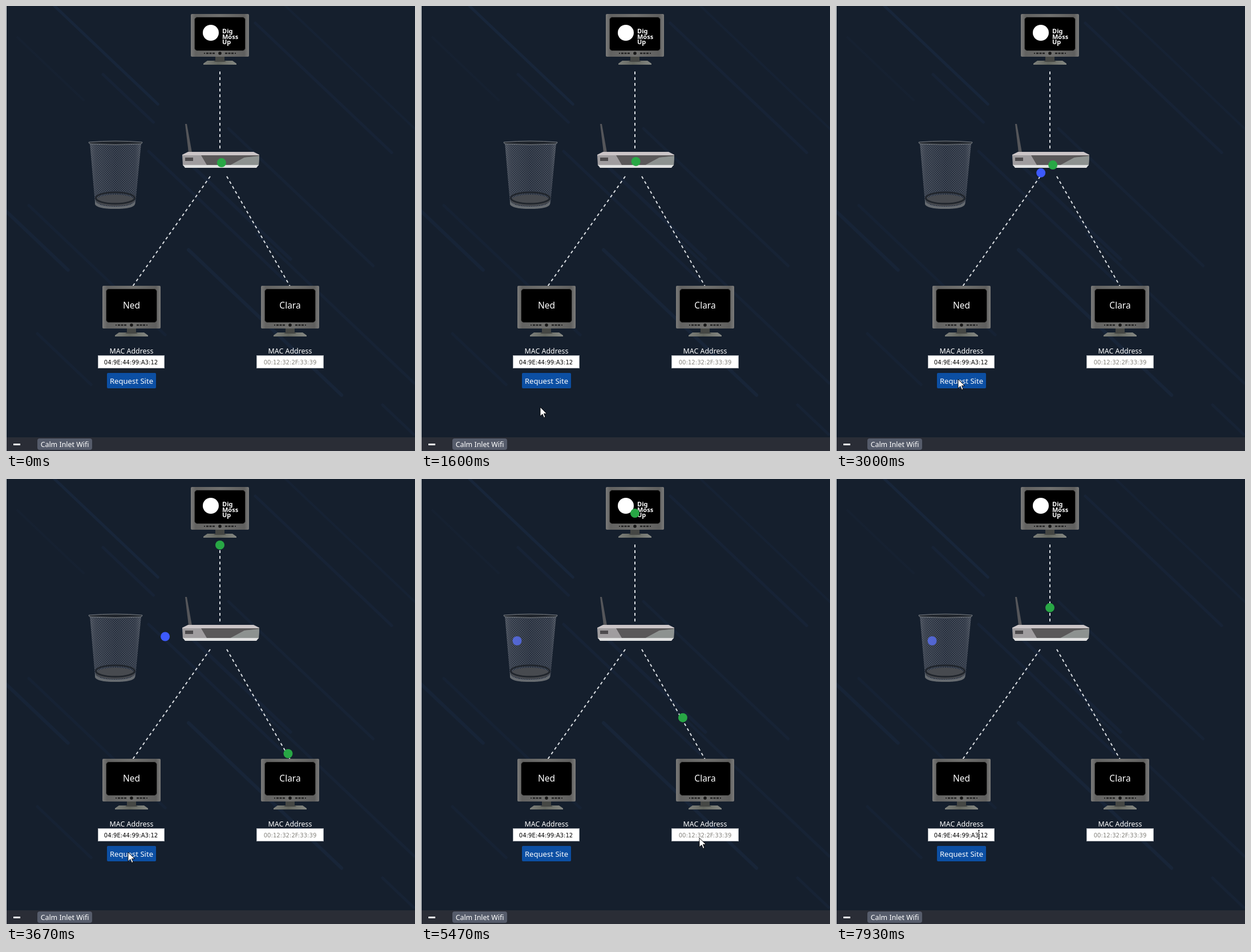
These frames come from a looping animation (717 by 781 pixels, 8 s). An HTML page:

```html
<!DOCTYPE html>
<html lang="en">
<head>
<meta charset="utf-8">
<title>Network packets</title>
<style>
  html, body { margin: 0; width: 100%; height: 100%; overflow: hidden; background: #151f2d; }
  svg { display: block; width: 100vw; height: 100vh; }
  text { font-family: "Noto Sans", "Open Sans", sans-serif; fill: #fff; text-anchor: middle; }
  .label { font-size: 12.4px; }
  .name { font-size: 15.5px; }
  .mac { font-family: "DejaVu Sans", sans-serif; font-size: 10.1px; }
  .brand { font: bold 11px "Noto Sans", sans-serif; text-anchor: start; }
</style>
</head>
<body>
<svg viewBox="0 0 717 781">
  <defs>
    <linearGradient id="case" x2="1">
      <stop offset="0" stop-color="#7b7b7a"/><stop offset=".08" stop-color="#626261"/>
      <stop offset=".5" stop-color="#70706e"/><stop offset=".92" stop-color="#5f5f5e"/>
      <stop offset="1" stop-color="#7b7b7a"/>
    </linearGradient>
    <linearGradient id="stand" x2="1">
      <stop offset="0" stop-color="#7d807b"/><stop offset=".45" stop-color="#63665f"/>
      <stop offset="1" stop-color="#858883"/>
    </linearGradient>
    <linearGradient id="bin" x2="1">
      <stop offset="0" stop-color="#a0a4ac" stop-opacity=".36"/>
      <stop offset=".12" stop-color="#7b808c" stop-opacity=".26"/>
      <stop offset=".5" stop-color="#565c6b" stop-opacity=".22"/>
      <stop offset=".88" stop-color="#666c7a" stop-opacity=".26"/>
      <stop offset="1" stop-color="#a0a4ac" stop-opacity=".36"/>
    </linearGradient>
    <pattern id="mesh" width="4" height="4" patternUnits="userSpaceOnUse">
      <path d="M0 0L4 4M4 0L0 4" stroke="#7c818c" stroke-width=".7" opacity=".5"/>
    </pattern>
    <g id="monitor">
      <path d="M-22 82H22L29 87V89H-29V87Z" fill="url(#stand)"/>
      <path d="M-8 74H8V82L11 84H-11L-8 82Z" fill="#454744"/>
      <rect x="-51" width="102" height="75" rx="2" fill="url(#case)"/>
      <rect x="-44.5" y="5.5" width="89" height="59" rx="5" stroke="#4b4b4a"/>
      <path d="M-24 69H-8M9 69H24" stroke="#222" stroke-width="2.4" stroke-dasharray="4 1.5"/>
      <circle cy="69" r="2.8" fill="#171717"/>
      <path d="M-28 69h2M26 69h2" stroke="#222" stroke-width="2"/>
    </g>
  </defs>

  <rect width="717" height="781" fill="#151f2d"/>
  <g id="streaks" stroke="#1b2b44" stroke-linecap="round"/>

  <g stroke="#dde1e5" stroke-width="2" stroke-dasharray="5 5">
    <path d="M375 115V250"/><path d="M358 299L222 492"/><path d="M387 299L498 492"/>
  </g>

  <use href="#monitor" x="375" y="14"/>
  <use href="#monitor" x="220" y="491"/>
  <use href="#monitor" x="498" y="491"/>
  <circle cx="359" cy="47" r="14" fill="#fff"/>
  <text class="brand" x="379" y="48">Dig</text>
  <text class="brand" x="379" y="57.5">Moss</text>
  <text class="brand" x="379" y="67">Up</text>
  <text class="name" x="220" y="531">Ned</text>
  <text class="name" x="498" y="531">Clara</text>

  <g id="router">
    <path d="M314 207H317L326 257H320Z" fill="#55565a"/>
    <path d="M319 256H434L444 261V264H309V261Z" fill="#cbc5c7"/>
    <path d="M309 262H444L443 280H310Z" fill="#a09d9f"/>
    <path d="M342 262H444V264L418 266L394 279H352Z" fill="#5a5859"/>
    <path d="M418 266L444 263L443 280H392Z" fill="#8d9290"/>
    <path d="M310 279H443L439 284H314Z" fill="#dfe0e0"/>
    <rect x="314" y="266" width="14" height="6" fill="#4d4b4d"/>
  </g>

  <circle id="blue" r="8" fill="#3d5afe"/>

  <g id="trash">
    <path d="M147 240H237L227 345Q225 356 191 356Q158 356 156 345Z" fill="url(#bin)"/>
    <path d="M147 240H237L227 345Q225 356 191 356Q158 356 156 345Z" fill="url(#mesh)"/>
    <ellipse cx="191.5" cy="341" rx="34" ry="10" fill="#474a4f"/>
    <ellipse cx="191.5" cy="337" rx="34" ry="10" fill="none" stroke="#20252c" stroke-width="3"/>
    <path d="M156 340Q158 352 191 352Q225 352 227 340L226 348Q223 356 191 356Q160 356 156 348Z" fill="#666b70"/>
    <path d="M145 239Q192 235 239 239Q239 242 235 242Q192 245 149 242Q145 242 145 239Z"
          fill="#20252c" stroke="#80858b"/>
  </g>

  <g id="greens" fill="#28a745"/>

  <text class="label" x="220" y="610">MAC Address</text>
  <text class="label" x="498" y="610">MAC Address</text>
  <g fill="#fff" stroke="#a9adb3">
    <rect x="161.5" y="613.5" width="116" height="22"/>
    <rect x="439.5" y="613.5" width="117" height="22"/>
  </g>
  <rect id="selection" x="452" y="618" width="92.5" height="13" fill="#0078d7"/>
  <text class="mac" x="219" y="629" style="fill:#000">04:9E:44:99:A3:12</text>
  <text class="mac" id="otherMac" x="498" y="629">00:12:32:2F:33:39</text>
  <rect x="177" y="644" width="86" height="27" rx="2" fill="#0c4fa3"/>
  <text x="220" y="662.5" font-size="13.1">Request Site</text>

  <rect y="757" width="717" height="24" fill="#2a2d36"/>
  <path d="M13 769.5H25" stroke="#fff" stroke-width="3"/>
  <rect x="55" y="759" width="96" height="20" rx="4" fill="#565c6b"/>
  <text class="label" x="103" y="774">Calm Inlet Wifi</text>
  <rect width="1" height="781" fill="#e4e6e8"/>

  <path id="caret" d="M250.5 618V631" stroke="#000"/>
  <path id="arrow" d="M0 0V16L4 12.5L6.5 18.5L9 17.5L6.5 11.5H11.5Z" fill="#fff" stroke="#000" stroke-width=".9"/>
  <path id="beam" d="M-1.5 -7.5H1.5M0 -7.5V7.5M-1.5 7.5H1.5" fill="none" stroke="#111"/>
</svg>

<script>
const LOOP = 8000, LEG = 1000, HANDOVER = 1005, REST = 120;
const ROUTER = [375, 270], SERVER = [375, 47], TRASH = [168.5, 284];
const LEFT_PC = [228, 482], RIGHT_PC = [494.5, 482];
const GREEN_STARTS = [-800, 755, 2260, 3765, 5270, 6770];
const BLUE_START = 2390;
// time, x, y of the pointer tip
const POINTER = [
  [450, 735, 725], [870, 465, 766], [1300, 213, 712], [1600, 209, 704], [1730, 209, 692],
  [2150, 214, 655], [4500, 214, 655], [4800, 300, 675], [5170, 478, 661], [5400, 488, 630],
  [5500, 488, 630], [5700, 488, 627], [7050, 488, 627], [7350, 400, 634], [7700, 250.5, 624]
];
// x, y, length, width, opacity of the diagonal background streaks
const STREAKS = [
  [85, 0, 250, 5, .6], [170, 120, 122, 5, .4], [20, 55, 160, 4, .2], [437, 30, 330, 5, .4],
  [490, 0, 320, 4, .3], [250, 255, 330, 5, .4], [310, 265, 260, 6, .4], [390, 215, 350, 5, .35],
  [0, 360, 150, 6, .45], [40, 350, 330, 5, .3], [55, 575, 130, 5, .3], [320, 428, 370, 6, .5],
  [440, 400, 380, 5, .35], [660, 700, 75, 5, .35]
];

const $ = id => document.getElementById(id);
const make = (tag, parent, attrs) => {
  const el = document.createElementNS("http://www.w3.org/2000/svg", tag);
  for (const key in attrs) el.setAttribute(key, attrs[key]);
  return parent.appendChild(el);
};
const show = (el, on) => { el.style.display = on ? "" : "none"; };
const moveTo = (el, [x, y]) => el.setAttribute("transform", `translate(${x} ${y})`);
const lerp = (a, b, k) => a.map((v, i) => v + (b[i] - v) * k);

// cubic-bezier(.25, .1, .25, 1)
function ease(p) {
  if (p <= 0) return 0;
  if (p >= 1) return 1;
  const curve = (u, a, b) => 3 * a * u * (1 - u) ** 2 + 3 * b * u * u * (1 - u) + u ** 3;
  let low = 0, high = 1;
  for (let i = 0; i < 22; i++) {
    const mid = (low + high) / 2;
    if (curve(mid, .25, .25) < p) low = mid; else high = mid;
  }
  return curve(low, .1, 1);
}

// A packet travels two eased legs, by way of the router.
const travel = (age, from, to) => age < HANDOVER
  ? lerp(from, ROUTER, ease(age / LEG))
  : lerp(ROUTER, to, ease((age - HANDOVER) / LEG));

function pointerAt(t) {
  const next = POINTER.findIndex(p => p[0] > t);
  if (next < 0) return POINTER.at(-1).slice(1);
  if (next === 0) return POINTER[0].slice(1);
  const a = POINTER[next - 1], b = POINTER[next];
  return lerp(a, b, (t - a[0]) / (b[0] - a[0])).slice(1);
}

for (const [x, y, length, width, opacity] of STREAKS)
  make("path", $("streaks"), { d: `M${x} ${y}l${length * .725} ${length * .689}`, "stroke-width": width, opacity });
const greens = GREEN_STARTS.map(() => make("circle", $("greens"), { r: 8 }));

function render(t) {
  greens.forEach((dot, i) => {
    const age = t - GREEN_STARTS[i];
    show(dot, age >= -REST && age < HANDOVER + LEG);
    moveTo(dot, travel(age, RIGHT_PC, SERVER));
  });
  show($("blue"), t >= BLUE_START - REST);
  moveTo($("blue"), travel(t - BLUE_START, LEFT_PC, TRASH));

  const tip = pointerAt(t), [x, y] = tip;
  const overField = x > 162 && x < 278 && y > 613 && y < 636;
  show($("arrow"), !overField);
  show($("beam"), overField);
  moveTo($("arrow"), tip);
  moveTo($("beam"), tip);

  const selected = t >= 6400 && t < 7900;
  show($("selection"), selected);
  $("otherMac").style.fill = selected ? "#d5e6f5" : "#85837d";
  show($("caret"), t >= 7900);
}

function frame() {
  render(performance.now() % LOOP);
  requestAnimationFrame(frame);
}
frame();
</script>
</body>
</html>
```
